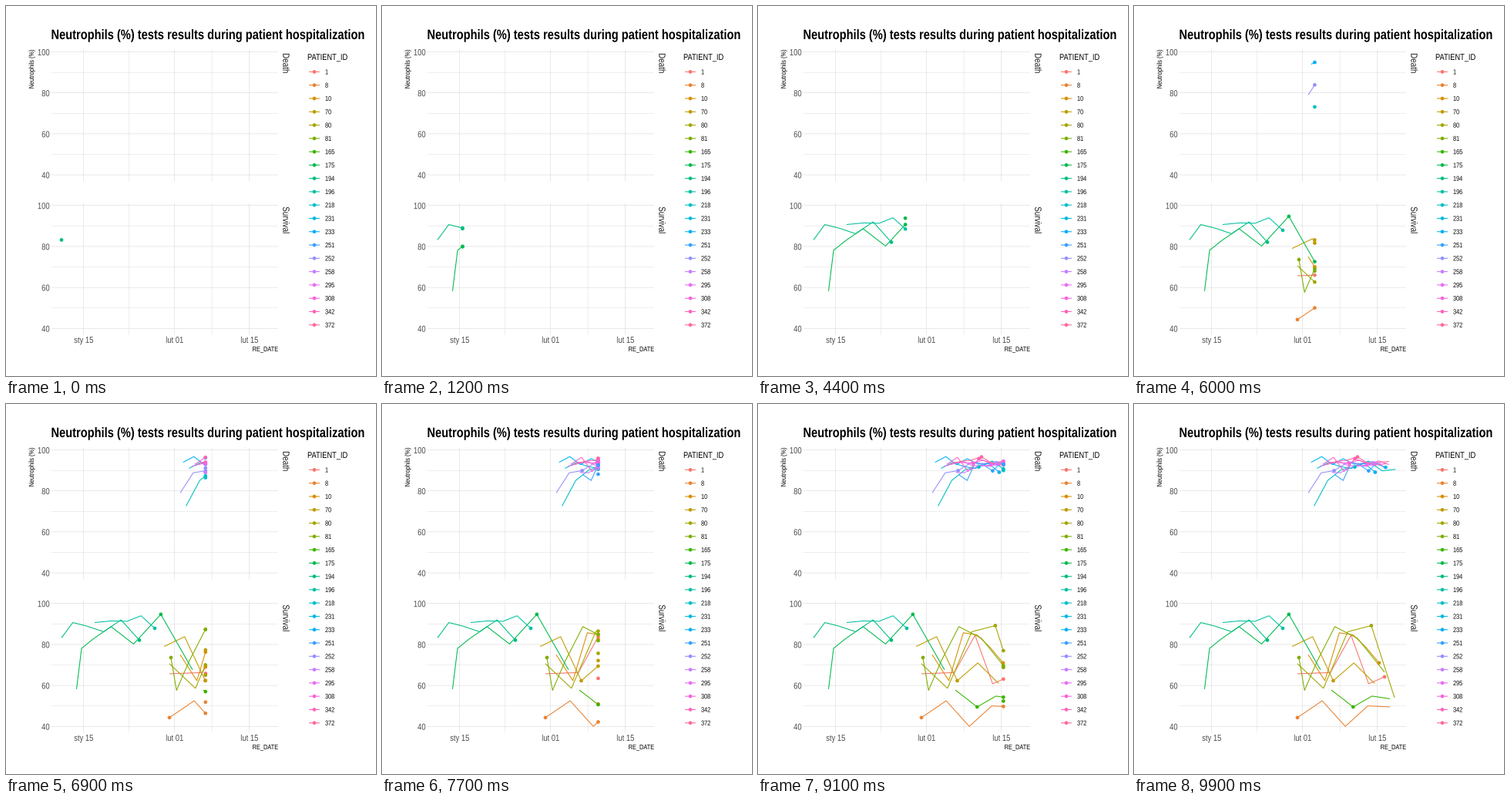
Recreate the animation shown at these times as a matplotlib script. Size 480x480 px, loop 10 s.

```python
import matplotlib.pyplot as plt
import numpy as np
from matplotlib.animation import FuncAnimation
from matplotlib.patches import PathPatch
from matplotlib.textpath import TextPath
from matplotlib.transforms import Affine2D

SIZE, DPI = 480, 100
PT = 72 / DPI
FRAMES, STEP = 100, 100
START, END = 72, 340       # reach of the sweeping date, in pixels
LEFT, RIGHT = 58.7, 352.8  # panel edges
DEATH, SURVIVAL = 59.6, 258.8  # height of the 100 % line
PERCENT = 2.6575
DAY = 6.936
NARROW = 0.82  # one condensed face for all text

# id: first and last test, pace of the tests, lasting dot, key levels in %
SURVIVORS = {
    1: (212, 325, 0.7, 4, [65.7, 66.3, 84.5, 60.8, 64.2]),
    8: (212, 332, 0.95, 0, [44.3, 52.5, 40, 50, 49.5]),
    10: (226, 318, 0.9, 5, [75, 62.3, 85.7, 84.7, 78.5, 71]),
    70: (205, 312, 1, 2, [79, 83.8, 62.3, 71, 61]),
    80: (212, 338, 0.95, 3, [70.6, 58.6, 86.2, 89.2, 54]),
    81: (214, 325, 1.7, 0, [73.6, 57.6, 71.7, 88.7, 83, 66.5]),
    165: (256, 332, 0.9, 1, [57.8, 49.5, 54.8, 53.5]),
    175: (91.5, 242, 1.75, 5, [58.2, 78.1, 82.8, 88.7, 80.2, 94.7, 67.6]),
    194: (72, 173, 1.2, 5, [83.2, 90.7, 88.9, 86.2, 92, 82.1]),
    196: (115, 193, 0.9, 4, [90.7, 91.5, 91.3, 94, 87.9]),
}
# id: first level in %, in order of admission
DECEASED = {252: 79, 233: 94, 218: 72.6, 231: 91, 295: 92,
            342: 93, 372: 93, 308: 94, 258: 89, 251: 88}
IDS = sorted(SURVIVORS | DECEASED)


def hcl(hue, chroma=100, light=65):
    """Polar CIELUV to clipped sRGB."""
    h = np.radians(hue)
    u = chroma * np.cos(h) / (13 * light) + 0.19784
    v = chroma * np.sin(h) / (13 * light) + 0.46834
    y = ((light + 16) / 116) ** 3
    xyz = [9 * y * u / (4 * v), y, y * (12 - 3 * u - 20 * v) / (4 * v)]
    rgb = np.clip(np.array([[3.2405, -1.5371, -0.4985],
                            [-0.9693, 1.8760, 0.0416],
                            [0.0556, -0.2040, 1.0572]]) @ xyz, 0, 1)
    return np.where(rgb > 0.0031308, 1.055 * rgb ** (1 / 2.4) - 0.055,
                    12.92 * rgb)


COLORS = {i: hcl(15 + 18 * k) for k, i in enumerate(IDS)}


def course(xs, levels, base):
    return np.column_stack([xs, base + (100 - np.asarray(levels)) * PERCENT])


def survivor(first, last, pace, stay, levels):
    """Tests spread from first to last, rarer with time if pace > 1."""
    xs = first + (last - first) * np.linspace(0, 1, len(levels)) ** pace
    return course(xs, levels, SURVIVAL), stay


def deceased(order, seed, level):
    """A level that settles high, with random swings after the first test."""
    rng = np.random.default_rng(seed)
    first = 226 + 3.8 * order
    xs = np.linspace(first, rng.uniform(310, END), 7)
    noise = rng.normal(0, rng.uniform(1, 3), 7) * (xs > first)
    levels = 93.5 + (level - 93.5) * np.exp((first - xs) / 20) + noise
    return course(xs, np.minimum(levels, 97.5), DEATH), rng.integers(2, 7)


PATIENTS = {i: survivor(*spec) for i, spec in SURVIVORS.items()}
PATIENTS |= {i: deceased(k, i, level)
             for k, (i, level) in enumerate(DECEASED.items())}

fig = plt.figure(figsize=(SIZE / DPI, SIZE / DPI), dpi=DPI, facecolor="white")
ax = fig.add_axes([0, 0, 1, 1])
ax.set_xlim(0, SIZE)
ax.set_ylim(SIZE, 0)
ax.axis("off")


def text(s, x, y, size, color="black", align=0, weight="normal", angle=0):
    """Text on baseline (x, y); align is the anchor's share of the width."""
    prop = {"family": "Liberation Sans", "weight": weight}
    path = TextPath((0, 0), s, size=size, prop=prop)
    box = path.get_extents()
    place = (Affine2D().translate(-align * box.x1, 0).scale(NARROW, -1)
             .rotate_deg(angle).translate(x, y))
    ax.add_patch(PathPatch(place.transform_path(path), fc=color, lw=0))


def stroke(xs, ys, color, width=1.07, z=3):
    return ax.plot(xs, ys, color=color, lw=width * PT, zorder=z,
                   solid_capstyle="butt", snap=False)[0]


def draw_panel(base, name):
    top, bottom = base - 3, base + 167.8
    for k in range(7):
        y = base + 10 * k * PERCENT
        stroke([LEFT, RIGHT], [y, y], "#cccccc", 0.32 if k % 2 else 0.43, 0)
        if k % 2 == 0:
            text(str(100 - 10 * k), 56.3, y + 4.4, 11.5, "#4d4d4d", 1)
    for k, day in enumerate((0, 8.5, 17, 24, 31)):
        x = 100.6 + day * DAY
        stroke([x, x], [top, bottom], "#cccccc", 0.32 if k % 2 else 0.43, 0)
    text(name, 359.3, top + 4.5, 12, "#1a1a1a", angle=90)


draw_panel(DEATH, "Death")
draw_panel(SURVIVAL, "Survival")
text("Neutrophils (%) tests results during patient hospitalization",
     58.5, 43, 17.86, weight="bold")
text("Neutrophils (%)", 36, 57, 9, align=1, angle=-90)
text("RE_DATE", RIGHT, 448, 9, align=1)
for label, day in (("sty 15", 0), ("lut 01", 17), ("lut 15", 31)):
    text(label, 100.6 + day * DAY, 437, 11.5, "#4d4d4d", 0.5)

text("PATIENT_ID", 391, 70, 11.3)
KEYS = [(400, 85.4 + 17.28 * k) for k in range(len(IDS))]
for i, (x, y) in zip(IDS, KEYS):
    stroke([x - 7, x + 7], [y, y], COLORS[i])
    text(str(i), 414, y + 3.1, 8.9)

lines = {i: stroke([], [], COLORS[i]) for i in IDS}
dots = ax.scatter([], [], s=(4.7 * PT) ** 2, lw=0, zorder=5)


def at(pts, front):
    return front, np.interp(front, *pts.T)


def revealed(pts, front):
    """The part of a polyline left of the front."""
    done = pts[pts[:, 0] <= front]
    if 0 < len(done) < len(pts):
        done = np.vstack([done, at(pts, front)])
    return done


def update(frame):
    front = START + (END - START) * frame / (FRAMES - 1)
    spots, colors = list(KEYS), list(COLORS.values())
    for i, (pts, stay) in PATIENTS.items():
        lines[i].set_data(*revealed(pts, front).T)
        # one dot rides the line, one skips every other test
        here = [at(path, front) for path in (pts, pts[1::2])
                if path[0, 0] <= front < path[-1, 0]]
        if front >= pts[stay, 0]:
            here.append(tuple(pts[stay]))
        spots += here
        colors += [COLORS[i]] * len(here)
    dots.set_offsets(spots)
    dots.set_facecolor(colors)
    return [*lines.values(), dots]


anim = FuncAnimation(fig, update, frames=FRAMES, interval=STEP,
                     repeat=True, repeat_delay=0)
plt.show()
```
